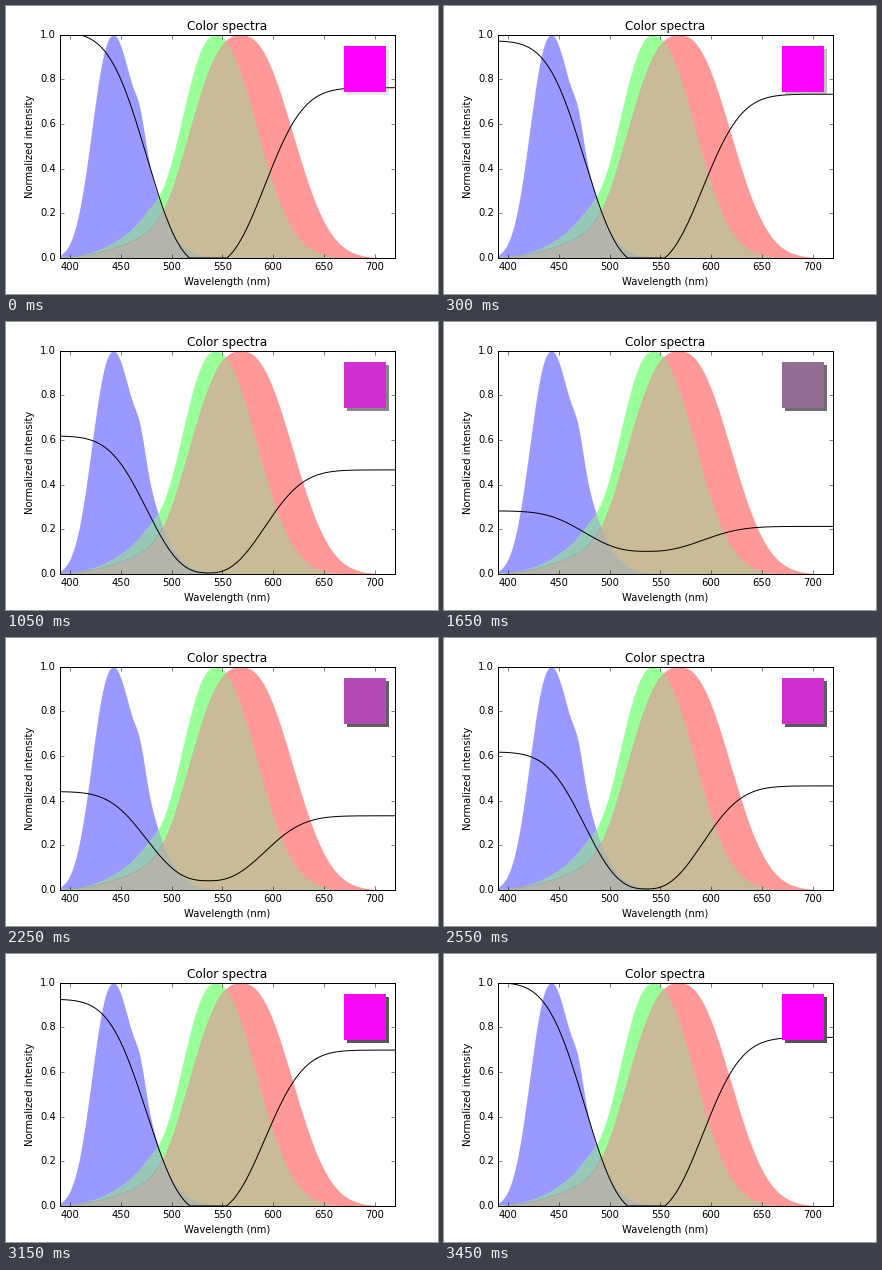
A matplotlib script for the animation above (3600 ms loop, 432 by 288 pixels).

```python
import colorsys

import numpy as np
import matplotlib.pyplot as plt
from matplotlib.animation import FuncAnimation
from matplotlib.patches import Rectangle

FRAMES = 24
INTERVAL = 150
SHADOW_STEP = 0.13  # the shadow is laid down once more on every frame

plt.style.use("classic")
plt.rcParams.update({
    "font.family": "DejaVu Sans",
    "font.size": 10,
    "text.kerning_factor": 0,
    "figure.facecolor": "white",
    "savefig.facecolor": "white",
    "savefig.dpi": "figure",
})


def bell(x, center, left, right, left_power=2, right_power=2):
    """Peak of height 1 with its own width and steepness on each side."""
    d = np.abs(x - center)
    return np.exp(-np.where(x < center, (d / left) ** left_power,
                            (d / right) ** right_power))


def linear(c):
    """sRGB channel to linear light."""
    return c / 12.92 if c <= 0.04045 else ((c + 0.055) / 1.055) ** 2.4


def purple(saturation):
    return colorsys.hls_to_rgb(5 / 6, 0.5, saturation)


wave = np.linspace(390, 720, 661)

# Cone sensitivities: a main peak plus a small shoulder
short = bell(wave, 443, 28, 37.5, 2.3, 1.75) + 0.075 * bell(wave, 469, 7, 7)
medium = (bell(wave, 543, 45.5, 54.6, 2.25, 2.15)
          + 0.12 * bell(wave, 473, 40.6, 20, 1.8))
long = (bell(wave, 568, 63.3, 64.3, 2.5, 2.42)
        + 0.05 * bell(wave, 463, 40, 24))

# Reflectance: a level for red and blue light with a green notch cut into it
level = np.where(wave < 537, 1.012, 0.763)
notch = bell(wave, 537, 73.3, 68, 2.7, 2.45)
NOTCH_LOW = -0.028
GREEN_PEAK = 0.69


def reflectance(saturation):
    r, g, _ = map(linear, purple(saturation))
    floor = NOTCH_LOW * r + GREEN_PEAK * g
    return np.clip(level * r + (floor - level * r) * notch, 0, 1)


fig = plt.figure(figsize=(6, 4), dpi=72)
ax = fig.add_axes([0.125, 0.125, 0.775, 0.775])
ax.set_xlim(390, 720)
ax.set_ylim(0, 1)
ax.set_title("Color spectra")
ax.set_xlabel("Wavelength (nm)")
ax.set_ylabel("Normalized intensity")

short_medium = np.minimum(short, medium)
layers = [
    (short, "#9999ff"),
    (medium, "#99ff99"),
    (long, "#ff9999"),
    (short_medium, "#98c8b8"),
    (np.minimum(medium, long), "#c9bb97"),
    (np.minimum(short_medium, long), "#b3b5ab"),
]
for height, color in layers:
    ax.fill_between(wave, 0, height, facecolor=color, linewidth=0)

inside = (wave > 400) & (long < short)
ax.plot(wave[inside], long[inside], color="#9ca4a4", lw=0.7)
curve, = ax.plot(wave, reflectance(1), color="black", lw=1)


def box(x, y, color, z):
    """Rectangle in stage pixels, y counted from the bottom."""
    patch = Rectangle((x, y), 42, 46, facecolor=color, linewidth=0,
                      transform=None, zorder=z)
    return ax.add_artist(patch)


shadow = box(341, 199, "#4d4d4d", 5)
swatch = box(338, 202, "#ff00ff", 6)


def update(n):
    saturation = abs(np.cos(np.pi * n / FRAMES))
    curve.set_ydata(reflectance(saturation))
    swatch.set_facecolor(np.clip(purple(saturation ** 0.92), 0, 1))
    shadow.set_alpha(1 - (1 - SHADOW_STEP) ** (n + 1))
    return curve, swatch, shadow


anim = FuncAnimation(fig, update, frames=FRAMES, interval=INTERVAL,
                     init_func=lambda: update(0), repeat=True,
                     repeat_delay=0, blit=False)
plt.show()
```
